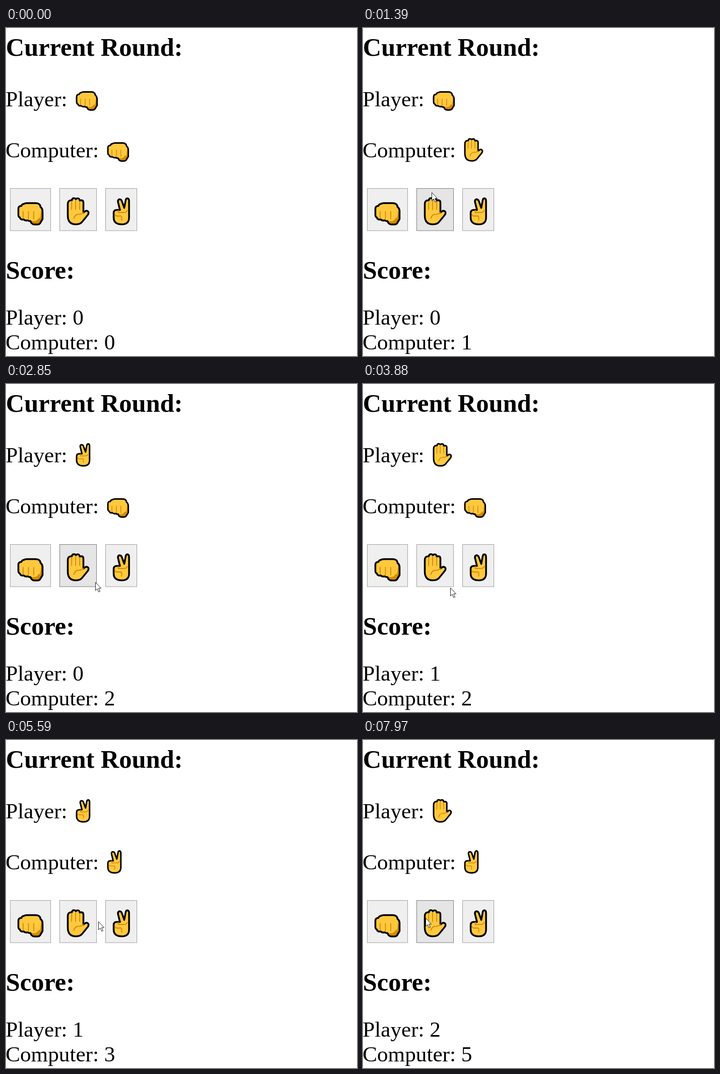
Write an HTML page that moves like this. It is 696 px wide and 649 px high and loops after 8 s.

```html
<!DOCTYPE html>
<html lang="en">
<head>
<meta charset="utf-8">
<title>Rock, paper, scissors</title>
<style>
  html, body { margin: 0; width: 100%; height: 100%; overflow: hidden; background: #fff; }
  svg { display: block; }
  text { font: 43.2px "Liberation Serif", "Times New Roman", serif; white-space: pre; }
  .title { font-size: 50.4px; font-weight: bold; }
  .skin { fill: #ffc83d; }
  .edge { stroke: #000; stroke-width: 3.5; stroke-linejoin: round; }
  .line { fill: none; stroke: #d08a10; stroke-width: 1.8; stroke-linecap: round; stroke-linejoin: round; }
  .btn { fill: #efefef; stroke: #a0a0a0; }
  .btn.hover { fill: #e5e5e5; stroke: #7c7c7c; }
  .btn.down { fill: #f5f5f2; stroke: #b8b8b8; }
</style>
</head>
<body>
<svg width="696" height="649" viewBox="0 0 696 649">
  <defs>
    <path id="fist" d="M13 13Q15 11.5 19 11.5H36Q44 11.5 45.5 17L46 19Q50 22 50 28V43L45 51.5Q43 53.8 40 53.8H34Q28 53.5 26 47Q23 47.5 20.5 45.5Q16 47 13 44H9Q5.5 43 5 40Q2 39 2 34V23Q2 17 8 17Q9 13.5 13 13Z"/>
    <g id="rock">
      <use href="#fist" class="skin"/>
      <path fill="#d68a00" d="M48 19Q50 23 50 28V43L45 51.5Q43 53.8 40 53.8H34Q28 53.5 27 47H35Q40 46 41 42Q46 42 46 35Z"/>
      <path class="line" d="M11.5 28V42M22 28V43M32.5 28V43"/>
      <use href="#fist" class="edge" fill="none"/>
    </g>
    <g id="paper">
      <path class="skin edge" d="M2 14V36Q2 53.5 18 53.5Q27 53.5 31 48L42 34.5Q44.5 30 42 27.8Q39.5 25.8 37 27.3L33 30V10Q33 6 29 5.8Q27.5 6 25.8 7Q25.5 2 21.5 2Q19 2 18 3.8Q17 1.8 14 1.8Q10.5 1.8 10 6Q2 5 2 14Z"/>
      <path class="line" d="M9.7 8V24M17.6 6V24M25.6 8V24M14 42Q16 34 23 33.5Q29 34 33 30"/>
    </g>
    <g id="scissors">
      <path class="skin edge" d="M14.5 25L10.5 9Q10 5 13 4Q16.5 3.5 18 7L23 21L26 5Q26.8 2 29.3 2Q32.5 2.5 32.5 7V41Q32 53.5 18 53.5Q2 53.5 2 40V31Q2 25 8 25Z"/>
      <path class="line" d="M11 26V30H21Q26 31 29 26M4 33Q5 37 8 37H16Q18 37 18 40V45"/>
    </g>
  </defs>

  <text class="title" x="-.2" y="55">Current Round:</text>
  <text x="-.8" y="155">Player:</text>
  <text x="-.8" y="256">Computer:</text>
  <use id="mine" transform="translate(138.3 116.8) scale(.845)"/>
  <use id="theirs" transform="translate(200.3 217.8) scale(.845)"/>

  <g id="row"></g>

  <text class="title" x="-.2" y="496">Score:</text>
  <text id="won" x="-.8" y="587"></text>
  <text id="lost" x="-.8" y="636"></text>

  <g id="pointer">
    <circle id="spot" r="12.3" fill="#ffff40" fill-opacity=".68"/>
    <path d="M.5 .5V16.5L4 13.2L6.8 19.5L9.4 18.4L6.6 12.2H11.5Z" fill="#fff" stroke="#222"/>
  </g>
</svg>
<script>
const LOOP = 8000, HOLD = 110, GAP = 17, TOP = 317, BOTTOM = 401;
const beats = { rock: "scissors", paper: "rock", scissors: "paper" };
const $ = id => document.getElementById(id);

function add(tag, attrs) {
  const el = document.createElementNS("http://www.w3.org/2000/svg", tag);
  for (const name in attrs) el.setAttribute(name, attrs[name]);
  return $("row").appendChild(el);
}

// One button per hand, side by side
let left = 8;
const buttons = Object.entries({ rock: 81, paper: 74, scissors: 63 }).map(([hand, width]) => {
  const x = left;
  left += width + GAP;
  const el = add("rect", { x: x + .5, y: TOP + .5, width: width - 1, height: 83.5 });
  add("use", { href: "#" + hand, x: x + 14.5, y: 335 });
  return { hand, el, holds: p => p.x >= x && p.x <= x + width && p.y >= TOP && p.y <= BOTTOM };
});

// The pointer sets off at a time and glides to a place
const glide = (at, x, y) => ({ at, x, y });
const entry = glide(70, 612, 584);
const glides = [
  glide(70, 42, 324), glide(1190, 136, 325), glide(1850, 209, 334), glide(2400, 196, 397),
  glide(2795, 177, 392), glide(3150, 173, 403), glide(4040, 162, 397), glide(4830, 212, 372),
  glide(5530, 73, 350), glide(6710, 108, 352), glide(7650, 124, 352)
];

// Longer ways take longer and bow upwards
function pointerAt(t) {
  let from = entry, to = entry;
  for (const g of glides) if (t >= g.at) [from, to] = [to, g];
  const dx = to.x - from.x, dy = to.y - from.y, dist = Math.hypot(dx, dy);
  const k = Math.min(1, Math.max(0, t - to.at) / (30 + 1.25 * dist));
  const ease = k * k * (3 - 2 * k);
  return {
    x: Math.round(from.x + dx * ease),
    y: Math.round(from.y + dy * ease - dist * dist / 1400 * Math.sin(Math.PI * ease))
  };
}

// Each click plays the hand under the pointer against the computer's
const answers = {
  960: "paper", 2080: "rock", 2950: "rock", 4200: "scissors",
  5020: "scissors", 5800: "paper", 6840: "rock", 7480: "scissors"
};
const rounds = Object.entries(answers).map(([time, computer]) => {
  const at = +time, p = pointerAt(at);
  return { at, computer, player: buttons.find(b => b.holds(p)).hand };
});

function draw(t) {
  const played = rounds.filter(r => t >= r.at + HOLD);
  const now = played[played.length - 1] || { player: "rock", computer: "rock" };
  const down = rounds.some(r => t >= r.at && t < r.at + HOLD);
  const wins = (a, b) => played.filter(r => beats[r[a]] === r[b]).length;

  $("mine").setAttribute("href", "#" + now.player);
  $("theirs").setAttribute("href", "#" + now.computer);
  $("won").textContent = "Player: " + wins("player", "computer");
  $("lost").textContent = "Computer: " + wins("computer", "player");

  const p = pointerAt(t);
  $("pointer").style.display = t < entry.at ? "none" : "";
  $("pointer").setAttribute("transform", `translate(${p.x} ${p.y})`);
  $("spot").style.display = down ? "" : "none";
  for (const b of buttons) {
    b.el.setAttribute("class", "btn" + (b.holds(p) ? down ? " down" : " hover" : ""));
  }
}

const start = performance.now();
function tick() {
  draw((performance.now() - start) % LOOP);
  requestAnimationFrame(tick);
}
tick();
</script>
</body>
</html>
```
